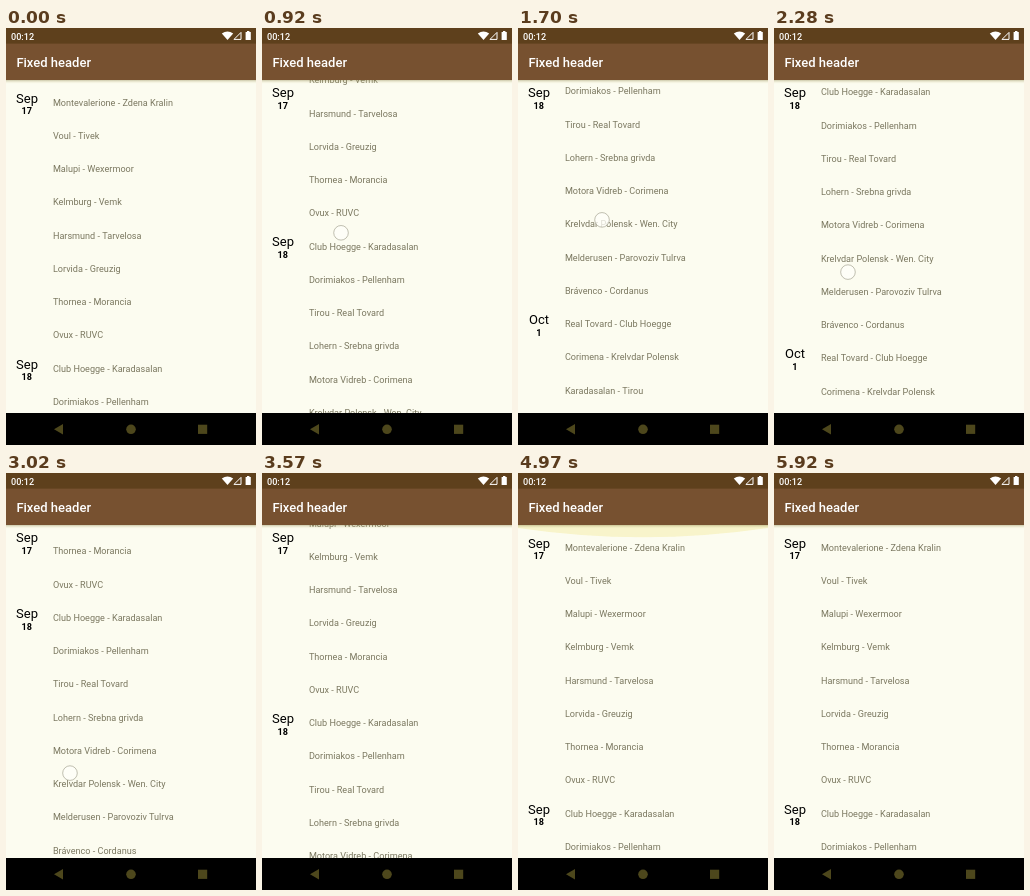
An HTML page with a canvas for the animation above (5960 ms loop, 250x417 px).

```html
<!DOCTYPE html>
<html lang="en">
<head>
<meta charset="utf-8">
<title>Fixed header</title>
<style>
  html, body { margin: 0; width: 100%; height: 100%; overflow: hidden; background: #000; }
  canvas { display: block; width: 250px; height: 417px; }
</style>
</head>
<body>
<canvas id="stage"></canvas>
<script>
const W = 250, H = 417, LOOP = 5960;
const TOP = 52, BOTTOM = 385, ROW = 33.25, PIN = 5.3;
const FONT = 'Roboto, "Open Sans", sans-serif';

const canvas = document.getElementById('stage');
const ctx = canvas.getContext('2d');
const dpr = window.devicePixelRatio || 1;
canvas.width = W * dpr;
canvas.height = H * dpr;
ctx.scale(dpr, dpr);

const matches = [
  'Montevalerione - Zdena Kralin', 'Voul - Tivek', 'Malupi - Wexermoor', 'Kelmburg - Vemk',
  'Harsmund - Tarvelosa', 'Lorvida - Greuzig', 'Thornea - Morancia', 'Ovux - RUVC',
  'Club Hoegge - Karadasalan', 'Dorimiakos - Pellenham', 'Tirou - Real Tovard', 'Lohern - Srebna grivda',
  'Motora Vidreb - Corimena', 'Krelvdar Polensk - Wen. City', 'Melderusen - Parovoziv Tulrva', 'Brávenco - Cordanus',
  'Real Tovard - Club Hoegge', 'Corimena - Krelvdar Polensk', 'Karadasalan - Tirou', 'Pellenham - Lohern',
  'Srebna grivda - Dorimiakos'
];
const dates = [
  { row: 0, month: 'Sep', day: '17' },
  { row: 8, month: 'Sep', day: '18' },
  { row: 16, month: 'Oct', day: '1' }
];

// [time, scroll offset]
const scrollKeys = [
  [60, 0], [920, 122], [1230, 197], [1700, 310.5], [1850, 322],
  [2280, 276.5], [3020, 196], [3450, 120], [3690, 62], [4060, 0]
];
// Finger strokes: [time, x, y]
const strokes = [
  [[60, 62, 330], [920, 79, 205], [1230, 88, 130]],
  [[1300, 66, 300], [1700, 84, 192], [1850, 86, 180], [2280, 74, 244], [3020, 64, 300], [3450, 56, 376]],
  [[3690, 100, 130], [4270, 91, 221], [4800, 86, 300]]
];

const clamp = (v, a = 0, b = 1) => Math.min(b, Math.max(a, v));

// Smooth curve through keys; the harmonic mean of slopes avoids overshoot
function curve(keys, t, col = 1) {
  const last = keys.length - 1;
  if (t <= keys[0][0]) return keys[0][col];
  if (t >= keys[last][0]) return keys[last][col];
  const slope = j => (keys[j + 1][col] - keys[j][col]) / (keys[j + 1][0] - keys[j][0]);
  const tangent = j => {
    if (j === 0) return slope(0);
    if (j === last) return slope(last - 1);
    const a = slope(j - 1), b = slope(j);
    return a * b > 0 ? 2 * a * b / (a + b) : 0;
  };
  const i = keys.findIndex(k => k[0] > t) - 1;
  const a = keys[i], b = keys[i + 1], d = b[0] - a[0];
  const u = (t - a[0]) / d, v = 1 - u;
  return a[col] * v * v * (1 + 2 * u) + b[col] * u * u * (3 - 2 * u)
    + d * u * v * (v * tangent(i) - u * tangent(i + 1));
}

// Edge glow grows with the pull and recedes after release
const glowAt = t => clamp((t - 4060) / 210, 0, 1.3) * clamp((5480 - t) / 680);

function text(str, x, y, size, color, weight = 400, align = 'left') {
  ctx.font = `${weight} ${size}px ${FONT}`;
  ctx.fillStyle = color;
  ctx.textAlign = align;
  ctx.fillText(str, x, y);
}

function box(x, y, w, h, color) {
  ctx.fillStyle = color;
  ctx.fillRect(x, y, w, h);
}

function poly(...p) {
  ctx.beginPath();
  for (let i = 0; i < p.length; i += 2) ctx.lineTo(p[i], p[i + 1]);
  ctx.closePath();
}

function disc(x, y, r, color) {
  ctx.beginPath();
  ctx.arc(x, y, r, 0, Math.PI * 2);
  ctx.fillStyle = color;
  ctx.fill();
}

function drawList(scroll) {
  matches.forEach((m, i) => {
    const y = 77.7 + i * ROW - scroll;
    if (y > TOP - 5 && y < BOTTOM + 10) text(m, 46.9, y, 9.11, '#7b7860');
  });
  dates.forEach((d, i) => {
    const pinned = row => Math.max(row * ROW - scroll, -PIN);
    const next = dates[i + 1];
    const y = next ? Math.min(pinned(d.row), pinned(next.row) - ROW) : pinned(d.row);
    text(d.month, 21, 74.6 + y, 13, '#000', 400, 'center');
    text(d.day, 20.8, 86.4 + y, 9.11, '#000', 700, 'center');
  });
}

function drawGlow(amount) {
  if (amount <= 0) return;
  ctx.globalAlpha = clamp(amount) * 0.8;
  ctx.beginPath();
  ctx.moveTo(0, TOP);
  ctx.lineTo(0, TOP + 3 * amount);
  ctx.quadraticCurveTo(W / 2, TOP + 22 * amount, W, TOP + 3 * amount);
  ctx.lineTo(W, TOP);
  ctx.fillStyle = '#f8f2c0';
  ctx.fill();
  ctx.globalAlpha = 1;
}

function drawBars() {
  box(0, 0, W, TOP, '#775130');
  box(0, 0, W, 15.6, '#5e401c');
  text('00:12', 5, 11.5, 9.11, '#fff', 500);
  text('Fixed header', 10.4, 38.8, 13, '#fff', 500);

  ctx.beginPath();
  ctx.moveTo(221.5, 12);
  ctx.lineTo(215.8, 5.4);
  ctx.quadraticCurveTo(221.5, 1.6, 227.2, 5.4);
  ctx.fillStyle = '#fff';
  ctx.fill();
  poly(228, 11.4, 235, 4.4, 235, 11.4);
  ctx.strokeStyle = '#fff';
  ctx.lineWidth = 1;
  ctx.stroke();
  box(239.6, 4, 5.2, 8, '#fff');
  box(241, 3, 2.4, 1, '#fff');

  const icon = '#4d471c';
  box(0, BOTTOM, W, H - BOTTOM, '#000');
  poly(48, 401.3, 57, 396, 57, 406.6);
  ctx.fillStyle = icon;
  ctx.fill();
  disc(125, 401.3, 4.8, icon);
  box(192, 396.7, 9.2, 9.2, icon);
}

function drawTouch(t) {
  const stroke = strokes.find(k => t >= k[0][0] && t < k[k.length - 1][0]);
  if (!stroke) return;
  disc(curve(stroke, t, 1), curve(stroke, t, 2), 7.3, 'rgba(255,255,250,.75)');
  ctx.strokeStyle = 'rgba(150,147,128,.65)';
  ctx.lineWidth = 0.9;
  ctx.stroke();
}

function draw(t) {
  box(0, 0, W, H, '#fcfcf0');
  ctx.save();
  ctx.beginPath();
  ctx.rect(0, TOP, W, BOTTOM - TOP);
  ctx.clip();
  drawList(curve(scrollKeys, t));
  drawGlow(glowAt(t));
  const shade = ctx.createLinearGradient(0, TOP, 0, TOP + 4);
  shade.addColorStop(0, 'rgba(130,120,60,.4)');
  shade.addColorStop(1, 'rgba(250,245,200,0)');
  box(0, TOP, W, 4, shade);
  ctx.restore();
  drawBars();
  drawTouch(t);
}

const start = performance.now();
function tick() {
  draw((performance.now() - start) % LOOP);
  requestAnimationFrame(tick);
}
tick();
</script>
</body>
</html>
```
